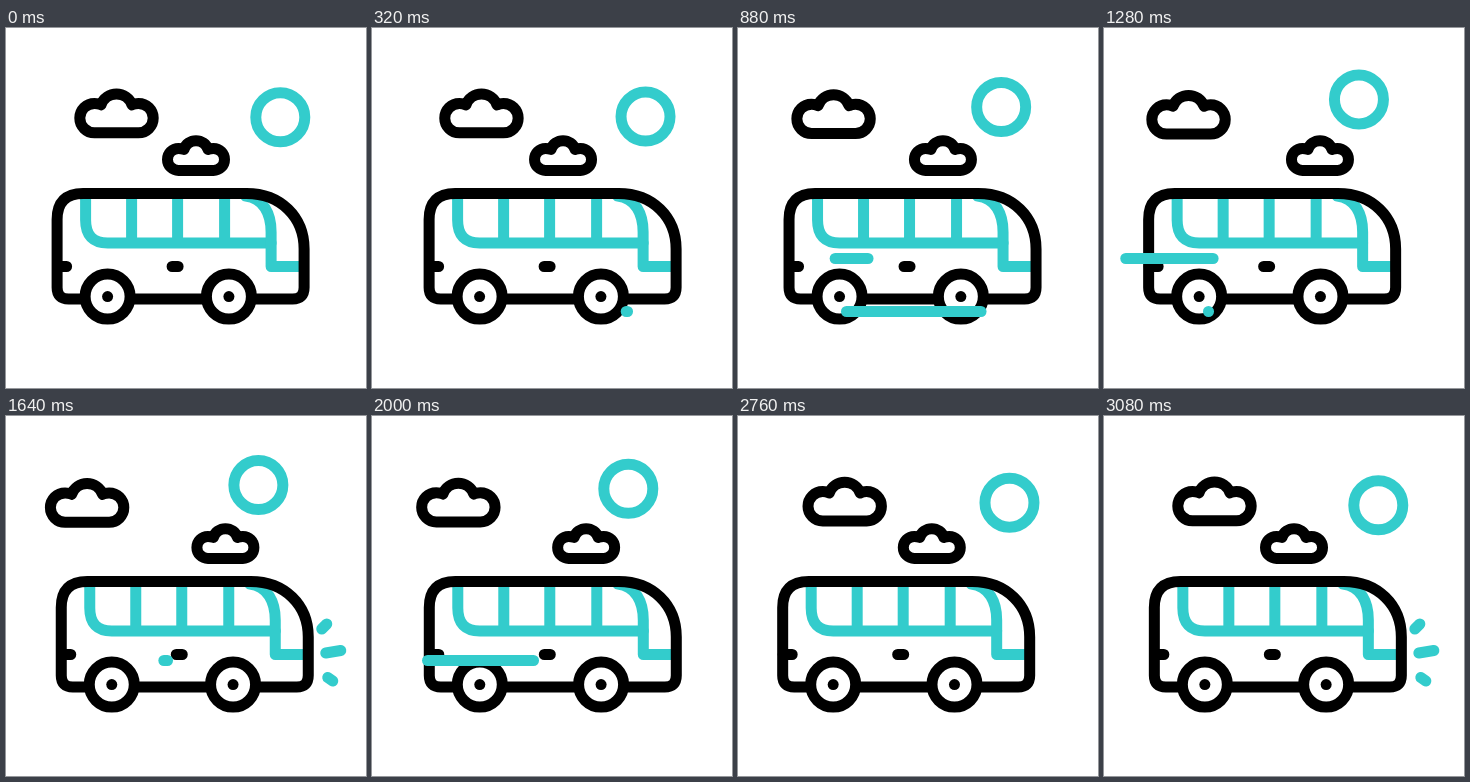
These frames come from a looping animation (360 by 360 pixels, 3100 ms). An HTML page:

```html
<!DOCTYPE html>
<html lang="en">
<head>
<meta charset="utf-8">
<title>Bus ride</title>
<style>
  html, body { margin: 0; height: 100%; overflow: hidden; background: #fff; }
  svg { display: block; width: 100vw; height: 100vh; }
  path, circle { fill: none; stroke: #000; stroke-width: 11; stroke-linecap: round; stroke-linejoin: round; }
  .teal, .teal * { stroke: #33cccc; }
  .wheel { fill: #fff; }
  .hub { fill: #000; stroke: none; }
</style>
</head>
<body>
<svg viewBox="0 0 360 360">
  <defs>
    <g id="wheel">
      <circle class="wheel" r="22.5"/>
      <circle class="hub" r="5.5"/>
    </g>
  </defs>
  <circle id="sun" class="teal" cx="274.3" cy="89.3" r="24.5"/>
  <path id="cloudA" d="M88.5 104.5a14.7 14.7 0 0 1 0-29.4q4 0 6.5 1.5a16.5 16.5 0 0 1 31 0q2.500-1.500 6.500-1.500a14.700 14.700 0 0 1 0 29.400z"/>
  <path id="cloudB" d="M172.500 142.400a11 11 0 0 1 0-22q3 0 5.500 1a12.600 12.600 0 0 1 24 0q2.500-1 5.500-1a11 11 0 0 1 0 22z"/>
  <g id="bus">
    <g class="teal">
      <path d="M80 168V192Q80 215 102 215H265.500M126 168V215M172 168V215M219 168V215"/>
      <path d="M240 168C258 170 265.500 186 265.500 204V238.500H297"/>
    </g>
    <path d="M77.500 165.500H241C275 165.500 298.500 189 298.500 221V259.500q0 11.500-11.500 11.500H63q-11.500 0-11.500-11.500V191.500q0-26 26-26z"/>
    <path d="M52 238.500H61M166.500 238.500H172.500"/>
    <use href="#wheel" x="102" y="268.600"/>
    <use href="#wheel" x="223.300" y="268.600"/>
    <path id="lights" class="teal" d="M312 213l5-5M316 237l15-2.500M318 261.500l5 3.500"/>
  </g>
  <g id="winds" class="teal"><path/><path/><path/></g>
</svg>
<script>
const LOOP = 3100, REST = 100, END = 3000;
const $ = id => document.getElementById(id);

const crossings = [0, 780, 1450, 2110, END]; // when the bus passes its middle position
const flashes = [1480, 2760];
const winds = [
  { y: 283.5, from: 255.5, to: 104.5, start: 185 },
  { y: 230.5, from: 130, to: 21.5, start: 540 },
  { y: 244.5, from: 161.5, to: 10.5, start: 1480 },
];

const clamp = v => Math.min(1, Math.max(0, v));
const ease = v => (v = clamp(v), v * v * (3 - 2 * v));
const mix = (a, b, k) => a + (b - a) * k;
const move = (id, x, y) => $(id).setAttribute("transform", `translate(${x} ${y})`);

// flattened sine, one half wave between crossings
function sway(t) {
  const i = Math.max(1, crossings.findIndex(c => c >= t));
  const part = (t - crossings[i - 1]) / (crossings[i] - crossings[i - 1]);
  return 7.1 * Math.tanh(1.6 * Math.sin(Math.PI * (i - 1 + part)));
}

// out and back once per loop
const drift = t => ease(Math.min((t - 60) / 1430, (END - t) / 1510));

function draw(t) {
  const k = drift(t);
  move("bus", sway(t) - .4, 0);
  move("sun", -22 * k, -20.3 * k);
  move("cloudA", -29.5 * k, .3 + 1.5 * k);
  move("cloudB", 29.5 * k, 0);

  winds.forEach(({ y, from, to, start }, i) => {
    const age = t - start;
    const head = mix(from, to, ease(age / 660));
    const tail = mix(from, to, ease((age - 520) / 430));
    const on = age > 0 && age < 1000;
    $("winds").children[i].setAttribute("d", on ? `M${head} ${y}H${tail + .01}` : "");
  });

  const lit = flashes.some(f => t >= f && t < f + 260);
  $("lights").style.visibility = lit ? "visible" : "hidden";
}

const began = performance.now();
function tick() {
  const t = (performance.now() - began) % LOOP - REST;
  draw(Math.min(END, Math.max(0, t)));
  requestAnimationFrame(tick);
}
tick();
</script>
</body>
</html>
```
